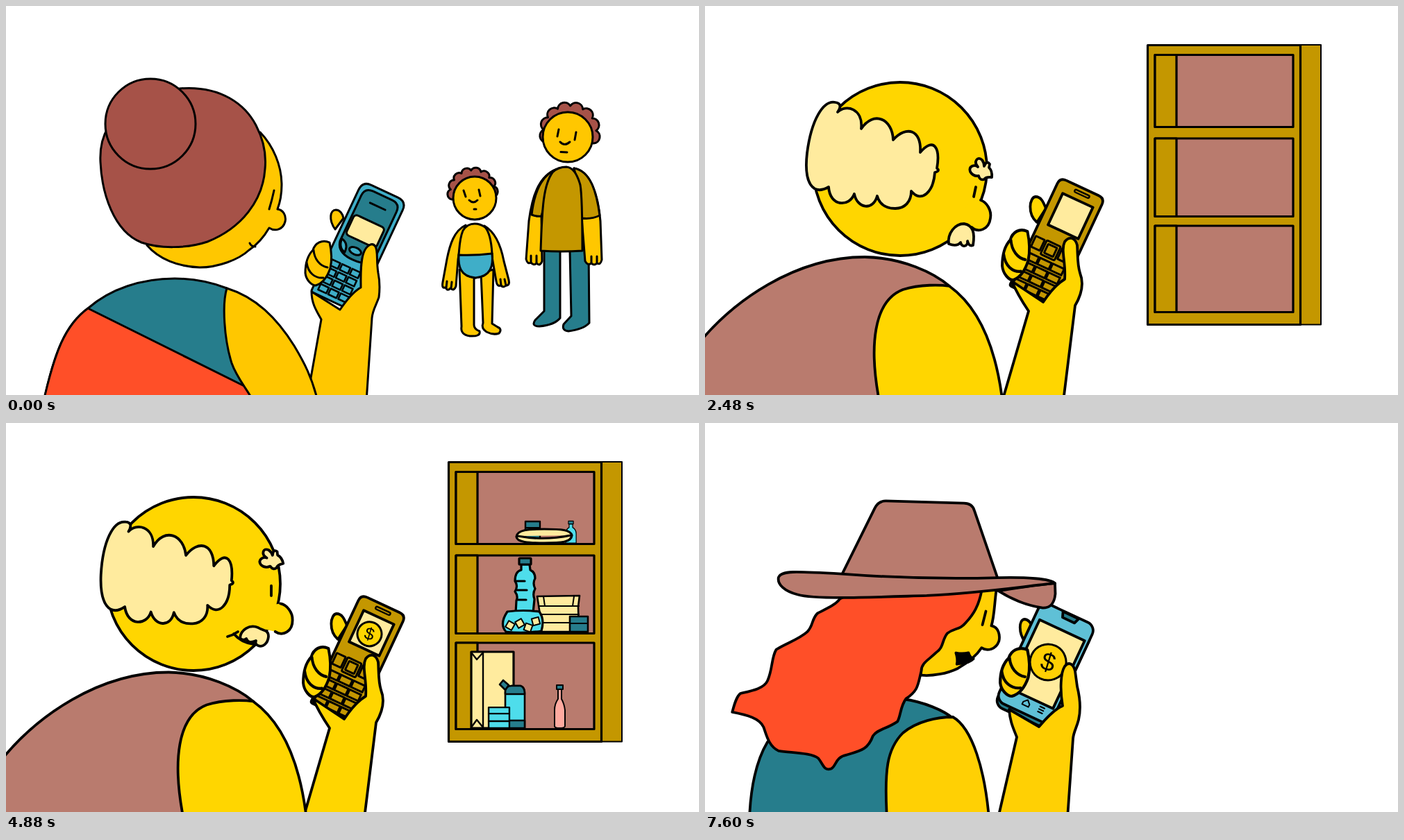
These frames come from a looping animation (998x561 px, 8000 ms). An HTML page:

```html
<!DOCTYPE html>
<html lang="en">
<head>
<meta charset="utf-8">
<title>Phone payments</title>
<style>
html, body { margin: 0; width: 100%; height: 100%; overflow: hidden; background: #fff; }
svg { display: block; width: 100vw; height: 100vh; }
</style>
</head>
<body>
<svg id="stage" viewBox="0 0 998 561" stroke="#000" stroke-linecap="round" stroke-linejoin="round"></svg>
<script>
const C = {
  gold: '#ffc700', sun: '#ffd600', amber: '#ffd004', brown: '#a65248', teal: '#267d8c',
  red: '#ff4f28', blue: '#3faec8', sky: '#5fc0d6', ochre: '#c49700', cream: '#ffeb9e',
  rose: '#b97b6e', cyan: '#4eddeb', pink: '#ffaaa0', ink: '#000'
};

const p = (d, fill = 'none', attr = '') => `<path d="${d}" fill="${fill}" ${attr}/>`;
const box = (x, y, w, h, fill, r = 0, attr = '') =>
  `<rect x="${x}" y="${y}" width="${w}" height="${h}" rx="${r}" fill="${fill}" ${attr}/>`;
const disc = (x, y, r, fill) => `<circle cx="${x}" cy="${y}" r="${r}" fill="${fill}"/>`;
const oval = (x, y, rx, ry, fill) => `<ellipse cx="${x}" cy="${y}" rx="${rx}" ry="${ry}" fill="${fill}"/>`;
const g = (body, id = '', attr = '') => `<g ${id && `id="${id}"`} ${attr}>${body}</g>`;
const grid = (xs, ys, draw) => ys.map(y => xs.map(x => draw(x, y)).join('')).join('');

function scallop(cx, cy, r, from, to, n, bump) {
  let d = '';
  for (let i = 0; i <= n; i++) {
    const a = (from + (to - from) * i / n) * Math.PI / 180;
    const pt = `${(cx + r * Math.cos(a)).toFixed(1)},${(cy + r * Math.sin(a)).toFixed(1)}`;
    d += i ? ` A${bump},${bump} 0 0 1 ${pt}` : `M${pt}`;
  }
  return p(d + 'Z', C.brown);
}

const coin = (id, x, y, r, fill, w) => g(g(
  `<circle r="${r}" fill="${fill}" stroke-width="${w}"/>` +
  `<text transform="rotate(-8)" y="${r * 0.46}" font-size="${r * 1.4}" text-anchor="middle" stroke="none"
    font-family="'Liberation Sans', Arial, sans-serif">$</text>`, id),
  '', `transform="translate(${x},${y})"`);

const phone = (x, y, body) => g(body, '', `transform="translate(${x},${y}) rotate(25)"`);

// Phone case: round on top, nearly square below
const slab = (w, h, r, fill) =>
  p(`M0,${r} Q0,0 ${r},0 H${w - r} Q${w},0 ${w},${r} V${h} H3 Q0,${h} 0,${h - 3}Z`, fill);

const fingers = (x, y, sx, sy, fill) => g(
  p('M36,1 C25,-4 15,2 12,12 C4,20 1,30 1,45 C2,55 10,63 16,63 C26,60 33,50 37,38 C40,25 38,10 36,1Z', fill) +
  p('M13,12 C14,25 22,35 33,37 M3,30 C5,45 15,53 27,52'),
  '', `transform="translate(${x},${y}) scale(${sx},${sy})"`);

// Family
const parentHair = scallop(812, 182, 38, 157, 385, 8, 9.8);
const parentFace = disc(809, 189, 36, C.gold) +
  p('M796,178 L794,188 M821,182 L819,193 M798,196 Q804,203 812,196');
const kidHair = scallop(672, 269, 32, 162, 370, 8, 7.7);
const kidFace = disc(675, 277, 31, C.gold) +
  p('M659,266 L662,275 M681,265 L683,274 M667,280 Q673,286 679,280');

const parentBefore = g(
  p('M775,350 V440 L762,453 Q756,462 768,462 Q790,460 798,450 V353Z', C.teal) +
  p('M812,353 L814,447 L803,459 Q800,468 810,469 Q832,466 840,457 L839,350Z', C.teal) +
  p('M818,234 C843,238 853,275 856,310 L858,366 Q856,374 851,371 Q847,375 843,371 Q838,375 834,368 L829,305 L822,250Z', C.gold) +
  p('M797,234 C765,243 757,280 753,310 L749,365 Q751,373 756,370 Q760,375 764,371 Q769,376 772,368 L771,303 L785,250Z', C.gold) +
  p('M851,371 V361 M843,371 V361 M756,370 V360 M764,371 V360') +
  p('M818,234 C843,238 851,272 855,302 Q843,308 829,306 L822,250Z', C.ochre) +
  p('M797,234 C768,242 760,275 757,301 Q764,304 771,303 L785,250Z', C.ochre) +
  p('M807,232 Q795,232 787,240 C774,258 772,290 770,353 Q800,355 830,353 C830,320 830,275 827,258 Q820,233 807,232Z', C.ochre) +
  parentHair + parentFace + p('M799,210.5 L808,211'), 'parentA');

const parentAfter = g(
  p('M828,238 C852,234 866,248 866,262 V318 L838,320Z', C.rose) +
  p('M845,240 Q858,252 860,290 M865,262 L872,265') +
  p('M790,238 C770,245 762,262 757,275 C748,300 742,325 739,345 Q736,360 742,364 Q749,368 756,361 Q764,358 763,345 C765,320 770,300 776,282Z', C.gold) +
  p('M743,362 L747,350 M751,364 L753,348 Q748,344 746,340') +
  p('M838,285 C842,310 846,330 846,342 Q836,345 841,352 Q846,350 850,352 Q848,362 855,363 Q862,367 866,363 Q874,364 874,354 Q879,345 868,336 C865,315 862,295 857,277Z', C.gold) +
  p('M857,362 L856,350 M866,363 L863,349') +
  p('M795,234 C772,242 763,258 757,276 Q766,282 776,283 L785,255Z', C.blue) +
  p('M820,235 C842,242 852,260 857,278 Q848,284 838,286 L825,255Z', C.blue) +
  p('M775,440 L762,453 Q756,462 768,462 Q790,460 798,450 V438Z', C.rose) +
  p('M814,442 L803,459 Q800,468 810,469 Q832,466 840,457 V441Z', C.rose) +
  p('M775,317 H836 Q840,390 839,444 Q826,445 814,442 L811,345 H800 L798,440 Q786,436 774,440Z', C.teal) +
  p('M807,233 Q790,234 784,248 C776,270 775,300 775,317 Q806,320 836,316 C837,290 834,262 828,248 Q822,234 807,233Z', C.blue) +
  p('M818,236 Q828,236 834,262 V284 Q820,278 819,258Z M795,235 L781,251 L786,238Z', C.ink) +
  p('M795,235 L799,246 L805,237 L813,246 L818,235 M805,238 V317 M808,267 H818') +
  parentHair + parentFace + p('M790,204 Q805,214 820,205'), 'parentB');

const kidBefore = g(
  p('M653,380 L656,462 Q654,474 668,476 Q684,477 682,469 Q674,466 674,460 L674,385Z', C.gold) +
  p('M684,385 L687,457 Q684,465 692,470 Q702,475 710,472 Q715,466 708,463 L700,458 L702,380Z', C.gold) +
  p('M662,316 C645,324 639,345 635,365 L629,398 Q627,408 633,406 Q636,412 640,407 Q645,412 648,404 L651,365 L657,330Z', C.gold) +
  p('M689,317 C706,327 713,347 717,368 L724,395 Q726,403 720,403 Q716,407 713,403 Q707,405 706,397 L700,362 L693,330Z', C.gold) +
  p('M634,406 L635,397 M641,407 L642,398 M713,403 L712,394 M720,403 L718,394') +
  p('M675,314 Q664,314 658,324 C653,336 653,350 652,358 C652,375 654,390 676,392 C698,390 702,375 700,357 C699,340 696,326 690,319 Q683,314 675,314Z', C.gold) +
  p('M652,359 Q676,360 700,357 C702,375 698,390 676,392 C654,390 651,375 652,359Z', C.blue) +
  kidHair + kidFace + p('M674,293 L677,293'), 'kidA');

const kidAfter = g(
  p('M657,318 Q634,316 633,336 V386 Q645,392 656,390Z', C.rose) +
  p('M634,379 Q644,383 655,381 V390 Q643,391 636,387Z', C.ochre) +
  p('M640,322 Q638,345 639,360') +
  p('M645,350 C641,365 636,375 636,384 Q644,390 637,393 L632,391 Q634,404 627,402 Q623,408 619,403 Q611,405 612,395 Q609,388 618,378 L626,345Z', C.gold) +
  p('M703,352 C708,366 712,376 711,382 Q702,387 708,392 L714,389 Q713,397 720,396 Q724,401 728,396 Q736,395 734,386 Q739,380 730,375 L719,342Z', C.gold) +
  p('M619,403 L622,392 M627,402 L627,393 M721,396 L721,387 M728,396 L726,386') +
  p('M664,316 C640,320 630,333 625,346 Q634,353 646,354 L658,332Z', C.blue) +
  p('M688,317 C706,322 714,334 720,345 Q713,352 703,354 L694,334Z', C.blue) +
  p('M657,460 Q653,474 668,476 Q685,477 683,469 L674,460Z', C.rose) +
  p('M686,457 Q682,465 692,470 Q702,475 710,472 Q716,466 708,463 L699,457Z', C.rose) +
  p('M652,360 H701 Q703,410 699,458 L686,459 L684,384 H674 V462 L657,462Z', C.teal) +
  p('M675,315 Q662,315 658,328 C654,340 654,350 653,360 Q676,364 700,360 C700,345 698,333 693,324 Q687,315 675,315Z', C.blue) +
  p('M664,317 L655,336 L654,352 Q662,340 666,318Z M686,317 Q696,325 698,340 Q690,335 686,317Z', C.ink) +
  p('M667,316 L669,324 L676,317 L682,324 L686,317 M676,317 V360') +
  kidHair + kidFace + p('M665,289 Q676,292 686,289 Q686,298 676,298 Q667,298 665,289Z', C.ink), 'kidB');

// Woman with a bun
const sceneBun = g(
  p('M56,563 C70,500 85,460 118,436 C150,408 195,393 243,393 C275,393 300,400 318,407 L352,563Z', C.teal) +
  p('M54,570 C70,500 85,460 118,436 L345,549 L356,570Z', C.red) +
  p('M366,182 C385,202 397,230 397,258 C397,275 394,285 391,293 C399,294 404,302 402,311 C399,322 388,326 379,320 C372,332 362,344 350,352 C335,366 305,377 279,377 C248,376 220,365 203,345Z', C.gold) +
  p('M386,266 Q383,280 379,293') +
  p('M351,342 Q353,347 359,347', 'none', 'id="bunSmile"') +
  g(p('M348,345 Q350,336 356,336 Q357,345 364,347 L353,354 Q350,349 348,345Z', C.ink, 'stroke-width="2"'), 'bunMouth') +
  p('M250,119 C310,114 345,143 360,172 C371,193 375,215 373,235 C370,280 340,320 290,340 C260,350 220,350 195,341 C155,325 138,270 136,225 C135,205 138,190 147,175Z', C.brown) +
  disc(208, 170, 65, C.brown) +
  p('M474,322 C464,308 467,294 475,294 C481,294 485,300 486,306Z', C.gold) +
  phone(513.6, 252.4,
    slab(70, 176, 14, C.blue) +
    p('M7,20 Q7,7 20,7 H50 Q63,7 63,20 V92 Q60,109 35,109 Q10,109 7,92Z', C.teal) +
    p('M23,24 H47') + box(10, 48, 48, 32, C.cream, 5) +
    p('M8,88 Q20,90 20,104 Q9,102 8,88Z', C.blue) + oval(33, 96, 9, 5, C.blue) +
    grid([8, 24, 40], [121, 134, 147, 160], (x, y) => box(x, y, 13, 9, C.blue, 0, 'stroke-width="2.6"')) +
    coin('coin1', 34, 65.5, 14.5, C.gold, 2)) +
  p('M433,570 L454,452 C446,438 440,428 440,412 L481,438 C492,422 502,411 511,406 C511,390 510,370 515,356 C519,345 528,340 532,347 C536,354 533,366 536,385 C539,400 538,412 537,420 C533,432 528,438 527,450 L519,570', C.gold) +
  fingers(430, 340, 1, 1, C.gold) +
  p('M318,407 C311,430 314,480 325,515 C332,535 345,550 354,566 L448,566 C440,535 430,515 415,490 C390,450 360,420 318,407Z', C.gold) +
  g(kidBefore + kidAfter, 'kid') + g(parentBefore + parentAfter, 'parent'),
  'scene1', 'stroke-width="3"');

// Shelf goods: [x, base y, final scale, start, duration, drawing]
const cracker = (x, y, deg) => box(x - 5, y - 5, 10, 10, C.cream, 0,
  `stroke-width="2" transform="rotate(${deg},${x},${y})"`);
const goods = [
  [758, 173, 1.4, 4640, 336, box(748, 142, 21, 31, C.teal, 0, 'stroke-width="2.4"') + p('M748,151 H769', 'none', 'stroke-width="2"')],
  [813, 173, 3.05, 4640, 720, g(p('M811,146 V151 Q806,154 806,160 V173 H821 V160 Q821,154 816,151 V146Z', C.cyan) + box(810, 142, 7, 4, C.teal), '', 'stroke-width="1.2"')],
  [775, 173, 1, 4480, 360, p('M735,164 C736,154 752,153 775,153 C800,153 813,154 815,162 C814,172 800,173 775,173 C752,173 736,172 735,164Z M737,163 Q775,170 813,162', C.cream)],
  [747, 272, 1, 4400, 400, p('M742,204 H754 L755,212 Q762,215 762,224 Q758,231 762,239 Q758,246 761,254 L759,274 H734 L735,256 Q738,250 733,243 Q738,235 733,228 Q733,214 742,212Z', C.cyan) + box(739, 195, 17, 9, C.teal, 1) + p('M735,228 H747 M735,241 H750 M737,255 H749')],
  [795, 302, 1, 4400, 400, p('M765,250 L826,249 L824,265 L825,301 H767 L769,276Z', C.cream, 'stroke-width="2.6"') + p('M768,264 H825 M768,276 H825 M768,288 H825 M774,250 L776,264 M818,250 L816,264', 'none', 'stroke-width="2"')],
  [812, 302, 1.15, 4640, 276, box(812, 279, 26, 22, C.teal, 0, 'stroke-width="2.6"') + p('M812,289 H838', 'none', 'stroke-width="2"')],
  [744, 302, 1, 4400, 440, p('M722,272 Q745,269 768,272 Q776,283 771,300 Q745,304 720,301 Q710,290 722,272Z', C.cyan) +
    cracker(726, 292, 30) + cracker(740, 289, 60) + cracker(752, 295, 20) + cracker(763, 286, 75)],
  [700, 440, 1, 4400, 400, box(670, 330, 61, 110, C.cream) + p('M687,330 V440 M670,331 L678,341 L687,331 M670,439 L678,428 L687,439', 'none', 'stroke-width="2.4"')],
  [733, 440, 1, 4480, 390, g(p('M719,440 V388 Q719,379 728,379 H741 Q747,381 747,388 V440Z', C.cyan) + p('M719,391 V388 Q719,379 728,379 H741 Q747,381 747,391Z M719,429 H747 V440 H719Z', C.teal) + p('M711,377 L716,371 L724,378 L719,385Z', C.teal), '', 'stroke-width="2.6"')],
  [710, 440, 1.4, 4560, 450, g(box(695, 410, 30, 30, C.cyan) + p('M695,419 H725 M695,430 H725'), '', 'stroke-width="2.4"')],
  [797, 440, 1.75, 4640, 420, g(p('M795,384 V398 Q790,405 790,414 V437 Q790,440 797,440 Q805,440 805,437 V414 Q804,405 800,398 V384Z', C.pink) + box(793, 378, 9, 6, C.teal), '', 'stroke-width="2"')]
];

// Old man
const cell = (y, h) => box(648, y, 199, h, C.rose) + box(648, y, 31, h, C.ochre);
const sceneShelf = g(
  g(box(858, 56, 29, 403.5, C.ochre, 0, 'stroke-width="2"') + box(637.5, 56.5, 220, 403, C.ochre) +
    cell(70.5, 104) + cell(191, 112.5) + cell(317, 124.5) +
    goods.map((it, i) => g(it[5], 'good' + i)).join(''), '', 'stroke-width="3.2"') +
  p('M478,312 C464,300 467,276 476,275 C485,275 488,285 491,292Z', C.sun) +
  phone(511.4, 247.4,
    slab(71, 172, 10, C.ochre) + box(27, 6, 23, 4, C.ochre, 2, 'stroke-width="2.4"') +
    box(13, 19, 48, 50, C.cream) +
    g(box(4, 91, 14, 17, C.ochre, 1) + box(21, 90, 22, 22, C.ochre, 2) + box(25, 94, 14, 14, C.ochre, 1) + box(46, 91, 18, 17, C.ochre, 1) +
      grid([3, 23, 43], [117, 131, 145, 159], (x, y) => box(x, y, 18, 10, C.ochre)), '', 'stroke-width="3"') +
    coin('coin2', 35, 46.5, 17.5, C.sun, 3)) +
  p('M428,570 L466,440 C458,428 448,412 442,397 L487,427 C497,412 508,400 518,394 C520,370 512,352 518,340 C524,332 533,333 536,345 C537,360 536,372 540,385 C546,400 543,415 533,432 L516,570', C.sun) +
  fingers(427, 324, 1.04, 1.13, C.sun) +
  g(p('M-12,490 C40,425 130,362 230,362 C285,363 330,385 352,404 L300,575 H-12Z', C.rose) +
    p('M252,575 C235,490 243,425 285,409 C310,401 340,402 352,404 C395,435 420,495 429,575Z', C.sun), 'manBody') +
  g(disc(281, 235, 125, C.sun) +
    g(p('M397,280 C406,283 413,295 411,306 C409,322 394,328 384,319 L366,312 L380,280Z', C.sun, 'stroke="none"') +
      p('M397,280 C406,283 413,295 411,306 C409,322 394,328 384,319'), 'manNose') +
    g(p('M390,261 L387,275'), 'manEye') +
    g(p('M382,239 C379,231 388,228 393,232 C386,224 393,216 399,222 Q402,226 402,231 Q406,222 410,228 L409,233 Q414,238 413,247 Q404,246 402,250 Q396,252 394,245 Q386,246 382,239Z', C.cream), 'manBrow') +
    g(p('M351,343 C349,328 360,314 373,314 C386,316 389,327 386,345 C381,347 379,343 378,339 C379,347 370,349 368,341 C363,347 356,345 351,343Z', C.cream), 'manLip') +
    g(p('M330,311 Q338,309 345,304 M339,307 Q350,320 368,322') +
      p('M348,313 C349,301 362,293 374,298 C382,303 389,301 389,311 C388,321 381,327 374,324 Q369,322 371,317 Q360,322 357,314 Q352,318 348,313Z', C.cream), 'manSmile') +
    g(p('M191,153 Q199,141 188,139 C170,135 153,165 147,212 C142,255 155,274 178,261 C180,290 208,290 215,271 C219,292 242,296 248,274 C252,288 262,292 274,292 C288,292 297,282 297,267 C312,285 329,268 331,240 Q339,238 334,234 C339,205 330,188 310,211 C312,178 290,172 271,193 C270,163 243,150 225,177 C228,148 203,141 191,153Z', C.cream), 'manHair'), 'manHead'),
  'scene2', 'stroke-width="3.8"');

// Woman with a hat
const sceneHat = g(
  p('M64,570 C66,520 75,485 90,460 C130,420 230,395 285,398 C315,402 345,415 357,426 L300,570Z', C.teal) +
  p('M262,570 C258,500 262,470 285,447 C305,430 335,424 357,424 C385,440 403,500 409,570Z', C.amber) +
  p('M461,316 C451,302 452,284 460,283 C467,283 470,291 473,296Z', C.amber) +
  phone(485.2, 256.6,
    box(1, 10, 85, 155, C.teal, 13) + box(0, 0, 86, 158, C.sky, 13) +
    p('M34,1 L37,9 H56 L59,1Z', C.teal) + box(8.5, 26, 71.5, 108, C.cream) +
    p('M37,143 L42,138 L47,143 V147 H37Z M62,139 H69 M62,143 H69 M62,147 H69', 'none', 'stroke-width="2"') +
    coin('coin3', 45.4, 76.4, 26, C.amber, 3)) +
  p('M422,570 L449,453 C444,440 439,430 438,413 L481,438 C492,425 505,412 515,408 C511,385 512,360 518,351 C524,343 531,348 533,358 L536,380 C541,400 541,415 538,428 C535,440 531,445 530,455 L522,570', C.amber) +
  fingers(424, 326, 1.12, 1.08, C.amber) +
  g(p('M399,222 C398,245 400,262 397,277 C408,278 411,290 410,298 C407,310 395,315 386,310 C380,322 370,332 355,343 C340,352 320,358 303,358 L300,300 L360,222Z', C.amber) +
    p('M387,257 L384,277') +
    p('M361,323 Q365,330 371,331', 'none', 'id="hatSmile"') +
    g(p('M350,321 Q360,322 368,319 Q371,326 376,327 C370,335 361,334 353,337 Q354,330 350,321Z', C.ink), 'hatMouth') +
    p('M378,228 C376,250 370,263 360,276 C352,288 345,285 335,294 C328,304 332,315 322,323 C312,335 302,340 303,352 C300,372 302,380 285,394 C278,405 280,420 276,428 C262,440 248,442 243,452 C238,472 228,475 208,483 C192,488 195,500 188,505 C178,510 176,500 168,492 C158,485 130,488 110,487 C95,482 90,465 85,455 C78,443 60,440 38,438 C40,425 42,415 47,410 C62,405 80,400 84,388 C90,370 86,355 92,342 C104,332 122,325 134,312 C142,302 138,294 146,284 C160,275 172,268 176,260 L230,228Z', C.red) +
    p('M175,226 L213,125 Q217,114 228,113 L340,105 Q352,104 356,114 L401,212Z', C.rose) +
    p('M402,226 C420,235 445,243 468,244 C480,243 484,235 484,222 L482,207 C455,212 425,220 402,226Z', C.rose) +
    p('M85,238 C88,228 105,227 175,224 C260,222 330,216 400,207 C440,202 475,201 482,207 C440,215 385,230 300,243 C230,252 140,265 115,260 C95,257 84,248 85,238Z', C.rose), 'hatHead'),
  'scene3', 'stroke-width="3.8"');

const stage = document.getElementById('stage');
stage.innerHTML = sceneBun + sceneShelf + sceneHat;

const el = {};
stage.querySelectorAll('[id]').forEach(n => el[n.id] = n);
const show = (id, on) => el[id].style.display = on ? '' : 'none';
const move = (id, tf) => el[id].setAttribute('transform', tf);
const span = (t, a, b) => Math.min(1, Math.max(0, (t - a) / (b - a)));
const ease = u => u * u * (3 - 2 * u);
const back = (u, s) => 1 + (s + 1) * (u - 1) ** 3 + s * (u - 1) ** 2;
const grow = (id, x, y, s) => {
  show(id, s > 0);
  move(id, `translate(${x},${y}) scale(${s}) translate(${-x},${-y})`);
};

function familyScale(t) {
  return 1 + 0.068 * ease(span(t, 880, 1200)) - 0.098 * ease(span(t, 1200, 1520)) + 0.03 * ease(span(t, 1520, 1760));
}

function drawBun(t) {
  grow('coin1', 0, 0, back(span(t, 320, 720), 2.4));
  const open = ease(span(t, 640, 960));
  grow('bunMouth', 355, 346, open);
  show('bunSmile', !open);
  const s = familyScale(t), dressed = t >= 1440;
  grow('kid', 676.5, 350, s);
  grow('parent', 803.5, 304, s);
  ['kid', 'parent'].forEach(n => { show(n + 'A', !dressed); show(n + 'B', dressed); });
}

function drawShelf(t) {
  grow('coin2', 0, 0, back(span(t, 2960, 3360), 2.6));
  const u = ease(span(t, 4400, 4880));
  const turn = (id, deg, dx = 0) => move(id, `translate(${dx * u},0) rotate(${deg * u},281,235)`);
  move('manBody', `translate(${4 * u},${-2.5 * u})`);
  move('manHead', `translate(${-11 * u},${-3 * u})`);
  turn('manNose', -8, 4);
  turn('manEye', -12);
  turn('manBrow', -18);
  turn('manHair', -4, 2);
  move('manLip', `translate(${-u},${-16 * u})`);
  show('manLip', u < 0.5);
  show('manSmile', u >= 0.5);
  goods.forEach(([x, y, s, start, dur], i) => grow('good' + i, x, y, s * span(t, start, start + dur)));
}

function drawHat(t) {
  const u = ease(span(t, 7040, 7600));
  grow('coin3', 0, 0, ease(span(t, 7040, 7440)));
  move('hatHead', `rotate(${5.7 * u},250,440)`);
  const open = ease(span(t, 7200, 7520));
  grow('hatMouth', 364, 327, open);
  show('hatSmile', !open);
}

const scenes = [[0, drawBun], [2480, drawShelf], [6320, drawHat]];

function update(ms) {
  const t = Math.floor(ms % 8000 / 80) * 80;
  const now = scenes.filter(s => t >= s[0]).length;
  scenes.forEach((s, i) => show('scene' + (i + 1), i + 1 === now));
  scenes[now - 1][1](t);
}

let t0;
function tick(now) {
  t0 ??= now;
  update(Math.max(0, now - t0));
  requestAnimationFrame(tick);
}
update(0);
requestAnimationFrame(tick);
</script>
</body>
</html>
```
